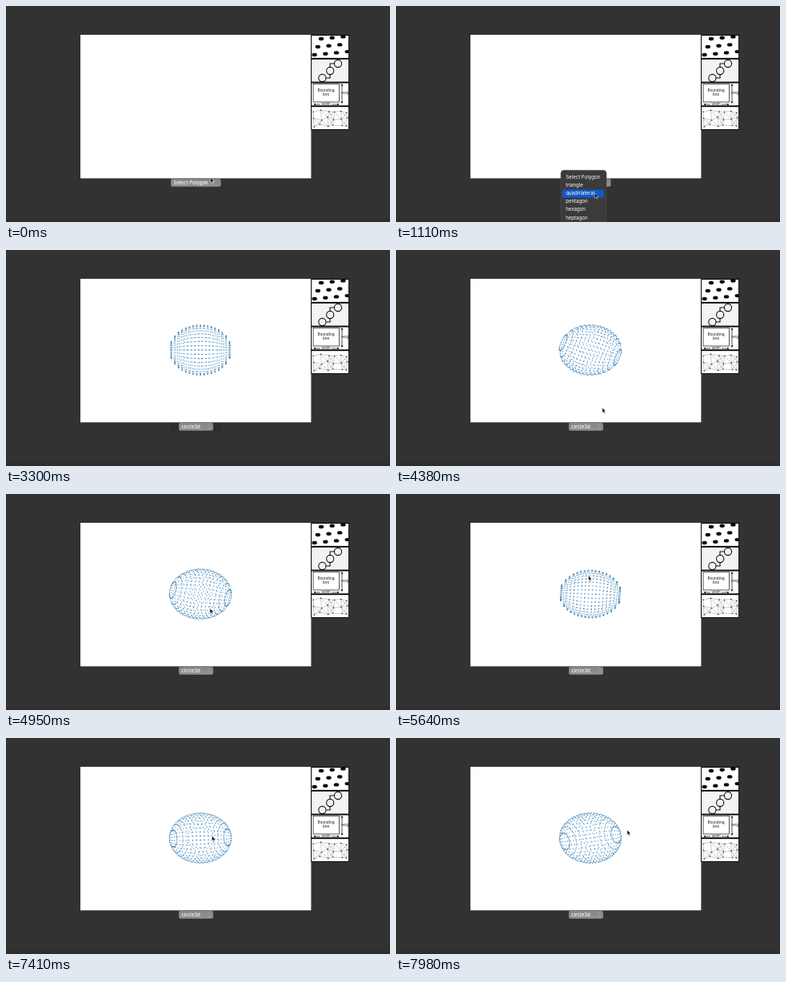
An HTML page for the animation above (8 s loop, 480x270 px).

```html
<!DOCTYPE html>
<html lang="en">
<head>
<meta charset="utf-8">
<title>Polygon picker</title>
<style>
html, body { margin: 0; width: 100%; height: 100%; overflow: hidden; background: #323232; }
svg { display: block; width: 480px; height: 270px; }
text { font: 6.1px Inter, "Open Sans", sans-serif; fill: #fff; }
#label { font-weight: 500; }
.thumb text { font-size: 4.7px; fill: #111; text-anchor: middle; }
.thumb .small { font-size: 4px; }
.line { fill: none; stroke: #111; }
</style>
</head>
<body>
<svg viewBox="0 0 480 270">
  <defs>
    <linearGradient id="grey" x2="0" y2="1">
      <stop stop-color="#838383"/><stop offset="1" stop-color="#929292"/>
    </linearGradient>
    <clipPath id="side"><rect x="382" y="36" width="46.5" height="118.500"/></clipPath>
  </defs>
  <rect width="480" height="270" fill="#323232"/>
  <rect y="266" width="480" height="4" fill="#302c2d"/>
  <rect x="93" y="36" width="288.400" height="179.400" fill="#fff"/>

  <rect x="381" y="36" width="48" height="118.800" fill="#050505"/>
  <g class="thumb" clip-path="url(#side)">
    <g id="cards"></g>
    <g id="spots" fill="#0a0a0a"></g>
    <g id="chain" class="line" stroke-width="1.1"></g>
    <rect class="line" x="384" y="97.500" width="32.500" height="22.500" stroke-width=".7"/>
    <text x="400" y="107.400">Bounding</text>
    <text x="400" y="112.200">box</text>
    <path class="line" d="M420 98V121M385 123H393M407 123H416" stroke-width=".7"/>
    <path d="M420 97l1.500 2.500h-3zM420 122l1.500-2.500h-3zM384.500 123l2.500-1.300v2.600zM416.500 123l-2.500-1.300v2.600z" fill="#111"/>
    <text class="small" x="400" y="124.400">Width</text>
    <text class="small" x="425.500" y="110">Height</text>
    <path id="net" class="line" stroke-width=".22"/>
    <path id="nodes" class="line" stroke-width="1.4" stroke-linecap="round"/>
  </g>

  <rect id="ghost" x="206" y="216" width="64" height="10" fill="#2d2d2d"/>
  <rect id="face" y="215.800" height="9.900" rx="2.300" fill="url(#grey)"/>
  <text id="label" y="223.200"></text>
  <path id="chevron" d="M-1.300 219.800L0 218.400L1.300 219.800M-1.300 221.800L0 223.200L1.300 221.800" fill="none" stroke="#b0b0b0" stroke-width=".6"/>

  <g id="ball" fill="none" stroke-width="1.3" stroke-linecap="round">
    <path id="blue" stroke="#3f8fca"/>
    <path id="dark" stroke="#47667e"/>
  </g>

  <g id="menu">
    <rect x="206" y="205.300" width="57" height="80" rx="4" fill="#3b3b3b" stroke="#505050" stroke-width=".5"/>
    <rect id="hover" x="208" width="52" height="10.200" rx="1.500" fill="#1259cb"/>
    <g id="items"></g>
  </g>
  <path id="cursor" d="M0 0V6.300L1.450 5L2.450 7.300L3.450 6.850L2.500 4.600H4.450Z" fill="#000" stroke="#fff" stroke-width=".5"/>
</svg>
<script>
const LOOP = 8000, STEP = 30;
const MENU_OPEN = 510, MENU_CLOSE = 2640, FADE = 180, PICKED = 2760, GHOST_END = 3390;
const TURN_START = 3660, TURN_EASE = 750;
const ROW_TOP = 208.4, ROW = 10.2;
const CX = 243, CY = 125, RX = 38.8, RY = 31.4;
const ITEMS = ["Select Polygon", "triangle", "quadrilateral", "pentagon", "hexagon", "heptagon"];

// pointer stops: time, x, y
const STOPS = [
  [450, 255.5, 214.5], [1650, 243, 248], [1980, 242, 260], [2250, 240, 280],
  [3660, 262, 274], [4950, 255, 143], [5640, 240.5, 102], [6840, 226, 130], [7980, 289, 115]
];

const $ = id => document.getElementById(id);
const set = (id, attrs) => Object.entries(attrs).forEach(([k, v]) => $(id).setAttribute(k, v));
const show = (id, on) => $(id).style.display = on ? "" : "none";
const clamp = v => Math.min(1, Math.max(0, v));
const ease = p => p * p * (3 - 2 * p);
const repeat = (n, f) => Array.from({ length: n }, (_, i) => f(i));
const dot = (x, y) => `M${x.toFixed(2)} ${y.toFixed(2)}h.01`;

function pointerAt(t) {
  const next = STOPS.findIndex(s => s[0] > t);
  const b = STOPS.at(next), a = next > 0 ? STOPS[next - 1] : next ? b : STOPS[0];
  const p = a === b ? 0 : ease(clamp((t - a[0]) / (b[0] - a[0])));
  return [a[1] + (b[1] - a[1]) * p, a[2] + (b[2] - a[2]) * p];
}

// A ball of evenly spaced rings, turned by the pointer's offset from its centre
function drawBall(t, mx, my) {
  const rings = 17, beads = 36;
  const turn = ease(clamp((t - TURN_START) / TURN_EASE));
  const yaw = .045 + turn * (.5 * Math.tanh((mx - CX) / 15) - .045);
  const pitch = turn * (my - CY) * .03;
  const ry = RY + turn * (Math.tanh((mx - CX) / 4) - 1);
  const paths = ["", ""];
  repeat(rings, i => repeat(beads, j => {
    const x = (2 * i + 1) / rings - 1, r = Math.sqrt(1 - x * x), a = 2 * Math.PI * j / beads;
    const y = r * Math.cos(a), z = r * Math.sin(a);
    const px = x * Math.cos(yaw) + z * Math.sin(yaw);
    const pz = z * Math.cos(yaw) - x * Math.sin(yaw);
    const py = y * Math.cos(pitch) - pz * Math.sin(pitch);
    paths[(i * 7 + j * 5) % 9 < 2 ? 1 : 0] += dot(CX + RX * px, CY + ry * py);
  }));
  set("blue", { d: paths[0] });
  set("dark", { d: paths[1] });
}

function drawButton(picked) {
  const x = picked ? 216 : 206;
  set("face", { x, width: picked ? 43 : 62.5 });
  set("label", { x: x + 3.3 });
  $("label").textContent = picked ? "circle3d" : ITEMS[0];
  set("chevron", { transform: `translate(${picked ? 254 : 260} 0)` });
}

function buildThumbs() {
  $("cards").innerHTML = repeat(4, i =>
    `<rect x="382" y="${37.1 + i * 29.7}" width="46.2" height="27.8" fill="${i === 1 ? "#f2f4f4" : "#fff"}"/>`).join("");

  $("spots").innerHTML = repeat(12, k => {
    const row = k % 3, col = Math.floor(k / 3);
    return `<ellipse cx="${394 - 4.2 * row + 13.7 * col}" cy="${41 + 10 * row - 1.3 * col}" rx="3.2" ry="2.2"/>`;
  }).join("");

  $("chain").innerHTML = repeat(3, i => {
    const x = 415 - 9.8 * i, y = 72 + 9 * i;
    const link = i === 0 ? "M410.5 72H405V76.5" : i === 1 ? "M405 85.5V90H400" : "";
    return `<circle cx="${x}" cy="${y}" r="4.6"/><path d="${link}"/>`;
  }).join("");

  let seed = 11;
  const random = () => (seed = seed * 16807 % 2147483647) / 2147483647;
  const nodes = repeat(18, i => [384 + i % 6 * 8.2 + random() * 4, 130 + Math.floor(i / 6) * 8.5 + random() * 5]);
  const near = (a, b) => Math.hypot(a[0] - b[0], a[1] - b[1]) < 13;
  set("net", { d: nodes.flatMap((a, i) => nodes.slice(i + 1).filter(b => near(a, b)).map(b => `M${a}L${b}`)).join("") });
  set("nodes", { d: nodes.map(p => dot(...p)).join("") });
}

function render(t) {
  const [x, y] = pointerAt(t), picked = t >= PICKED;
  set("cursor", { transform: `translate(${x} ${y})` });
  drawButton(picked);
  show("ghost", picked && t < GHOST_END);

  $("menu").style.opacity = t < MENU_OPEN ? 0 : clamp(1 - (t - MENU_CLOSE) / FADE);
  const row = Math.max(0, Math.floor((y - 2 - ROW_TOP) / ROW));
  set("hover", { y: ROW_TOP + row * ROW + .6 });

  show("ball", picked);
  if (picked) drawBall(t, x, y);
}

buildThumbs();
$("items").innerHTML = ITEMS.map((s, i) => `<text x="212.2" y="${215.6 + i * ROW}">${s}</text>`).join("");

const start = performance.now();
function tick() {
  const t = Math.max(0, performance.now() - start) % LOOP;
  render(Math.floor(t / STEP) * STEP);
  requestAnimationFrame(tick);
}
render(0);
requestAnimationFrame(tick);
</script>
</body>
</html>
```
